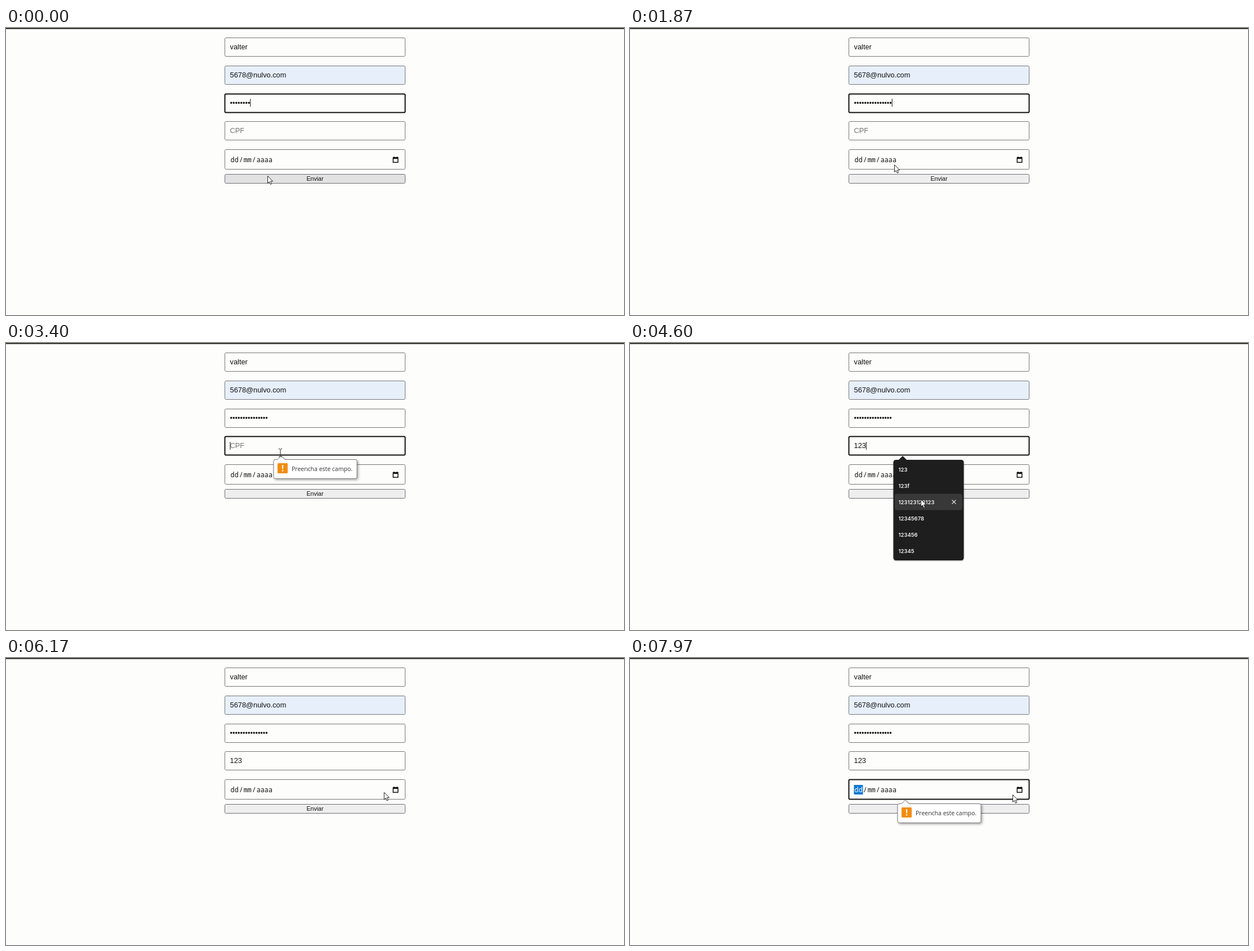
Animation of 1097 by 511 pixels, one loop 8 s. Source, as an HTML page:

```html
<!DOCTYPE html>
<html lang="pt-BR">
<head>
<meta charset="utf-8">
<title>Formulário</title>
<style>
html, body { margin: 0; width: 100%; height: 100%; overflow: hidden; background: #fdfdfc; }
svg { display: block; width: 1097px; height: 511px; }
text { white-space: pre; fill: #111; font: 12.8px "Liberation Sans", Arial, sans-serif; }
.field { fill: #fdfdfc; stroke: #767676; }
.field.focus { stroke: #101010; stroke-width: 2; }
.date text { font: 11.73px "Noto Sans Mono", monospace; }
#send text { font-size: 10.67px; text-anchor: middle; }
#tip text { font: 10.5px "Open Sans", "Noto Sans", sans-serif; fill: #333; }
#list text { font: 600 9.5px Inter, sans-serif; fill: #f0f0f0; }
</style>
</head>
<body>
<svg>
  <rect width="1097" height="2" fill="#3c3a30"/>
  <g id="fields"></g>
  <text x="397.6" y="38">valter</text>
  <text x="397.6" y="88">5678@nulvo.com</text>
  <text x="397.6" y="137.5" id="password"></text>
  <text x="397.6" y="187.3" id="cpf"></text>
  <g class="date">
    <rect id="daySel" x="397.5" y="226" width="16" height="17" fill="#0a78d0"/>
    <text x="398.6" y="239" id="day">dd</text>
    <text x="413.7" y="239">/</text>
    <text x="421.7" y="239">mm</text>
    <text x="436.8" y="239">/</text>
    <text x="444.8" y="239">aaaa</text>
    <path d="M686.5 230h10v10h-10zM688 233v5.6h7V233z" fill="#111" fill-rule="evenodd"/>
    <path d="M688 229h1.6v2h-1.6zM693.4 229h1.6v2h-1.6z" fill="#111"/>
  </g>
  <g id="send">
    <rect x="388.5" y="260.5" width="320" height="16" rx="2" stroke="#6f6f76"/>
    <text x="548.5" y="272.4">Enviar</text>
  </g>
  <rect id="caret" width="1" height="14" fill="#111"/>
  <g id="tip">
    <path d="M478 207.5H482L488.5 201L495 207.5H620Q623 207.5 623 210.5V238.5Q623 241.5 620 241.5H478Q475 241.5 475 238.5V210.5Q475 207.5 478 207.5Z"
      fill="#fff" stroke="#777" style="filter:drop-shadow(2px 2px 2px #0005)"/>
    <rect x="482" y="214" width="18" height="18" rx="1.5" fill="#f28c0f"/>
    <path d="M489.8 217.5h2.6l-.4 7h-1.8zM490 226.2h2.2v2.2H490z" fill="#fff"/>
    <text x="507" y="228">Preencha este campo.</text>
  </g>
  <g id="list">
    <path d="M477 208L484 201L491 208H587.5Q592.5 208 592.5 213V382Q592.5 387 587.5 387H472.5Q467.5 387 467.5 382V213Q467.5 208 472.5 208Z"
      fill="#1e1e1e" style="filter:drop-shadow(0 1px 1px #0005)"/>
    <g id="row">
      <rect x="470" y="210.5" width="120" height="29" rx="4" fill="#383838"/>
      <path d="M571.5 221.5l7 7m0-7l-7 7" stroke="#ddd" stroke-width="1.2"/>
    </g>
  </g>
  <path id="arrow" d="M.5 .5V13.5L3.4 10.7L5.4 15.4L7.6 14.4L5.6 9.9H9.6Z" fill="#fff" stroke="#222"/>
  <path id="beam" d="M-3 -6.5h2l1 1 1-1h2M0 -5.5v12M-3 7.5h2l1-1 1 1h2" fill="none" stroke="#222"/>
</svg>
<script>
const LOOP = 8000;
const $ = id => document.getElementById(id);
const show = (id, on) => $(id).setAttribute("visibility", on ? "visible" : "hidden");
const move = (id, x, y) => $(id).setAttribute("transform", `translate(${x} ${y})`);
const add = (parent, tag, attrs) => {
  const el = document.createElementNS("http://www.w3.org/2000/svg", tag);
  for (const key in attrs) el.setAttribute(key, attrs[key]);
  return $(parent).appendChild(el);
};

const fields = [17.5, 67.5, 117.5, 166.5, 216.5].map((y, i) =>
  add("fields", "rect", { class: "field", x: 388.5, y, width: 320, height: i < 4 ? 33 : 35, rx: 2 }));
fields[1].style.fill = "#e7effb";

["123", "123f", "123123123123", "12345678", "123456", "12345"].forEach((label, i) => {
  add("list", "text", { x: 476.5, y: 228.8 + 29 * i }).textContent = label;
});

// Pointer stops: time, x, y
const stops = [
  [0, 464, 263], [850, 464, 263], [1300, 469, 243], [1900, 469, 243],
  [2250, 472, 264], [3000, 472, 264], [3250, 487, 195], [3750, 487, 195],
  [4200, 505, 240], [4550, 516, 278], [4650, 516, 278], [4880, 815, 405],
  [5080, 815, 405], [5330, 673, 272], [5600, 672, 240], [6500, 670, 238],
  [6850, 668, 266], [7250, 668, 266], [7650, 679, 243], [LOOP, 679, 243]
];

function pointer(t) {
  const i = Math.max(1, stops.findIndex(s => s[0] > t));
  const [t0, x0, y0] = stops[i - 1], [t1, x1, y1] = stops[i];
  const p = Math.max(0, (t - t0) / (t1 - t0));
  return [x0 + (x1 - x0) * p, y0 + (y1 - y0) * p];
}

const within = (t, from, to) => t >= from && t < to;
const typed = (t, start, step, max) =>
  Math.max(0, Math.min(max, Math.floor((t - start) / step) + 1));

function draw(t) {
  const dots = 8 + typed(t, 620, 130, 7);
  const digits = typed(t, 3860, 130, 3);
  const focus = t < 2950 ? 2 : t < 5040 ? 3 : t >= 7100 ? 4 : -1;

  fields.forEach((el, i) => el.classList.toggle("focus", i === focus));
  $("password").textContent = "•".repeat(dots);
  $("cpf").textContent = digits ? "123".slice(0, digits) : "CPF";
  $("cpf").style.fill = digits ? "" : "#757575";
  show("daySel", focus === 4);
  $("day").style.fill = focus === 4 ? "#fff" : "";

  // The caret blinks from the latest key press or focus change
  const since = t - [0, 620, 750, 880, 1010, 1140, 1270, 1400, 2950, 3860, 3990, 4120]
    .filter(k => k <= t).pop();
  show("caret", (focus === 2 || focus === 3) && since % 1000 < 500);
  if (focus === 2) move("caret", 397.5 + dots * 4.48, 126);
  else move("caret", 397.5 + digits * 7.12, 176);

  const second = t > 5000;
  show("tip", within(t, 3050, 3860) || t >= 7300);
  $("tip").setAttribute("opacity", Math.min(1, (t - (second ? 7300 : 3050)) / 100));
  move("tip", 0, second ? 52 : 0);

  const [x, y] = pointer(t);
  const row = Math.floor((y - 210) / 29);
  show("list", within(t, 3950, 4900));
  show("row", within(t, 3950, 4900) && x < 590 && row >= 0 && row < 6);
  move("row", 0, row * 29);

  const [hx, hy] = pointer(Math.max(0, t - 40));
  const hover = hx > 388 && hx < 709 && hy > 260 && hy < 277 && !within(t, 3950, 4900);
  $("send").setAttribute("fill", hover ? "#e2e2e2" : "#eee");

  const overText = y > 166 && y < 200;
  show("arrow", !overText);
  show("beam", overText);
  move("arrow", x, y);
  move("beam", x, y);
}

function tick() {
  draw(performance.now() % LOOP);
  requestAnimationFrame(tick);
}
tick();
</script>
</body>
</html>
```
